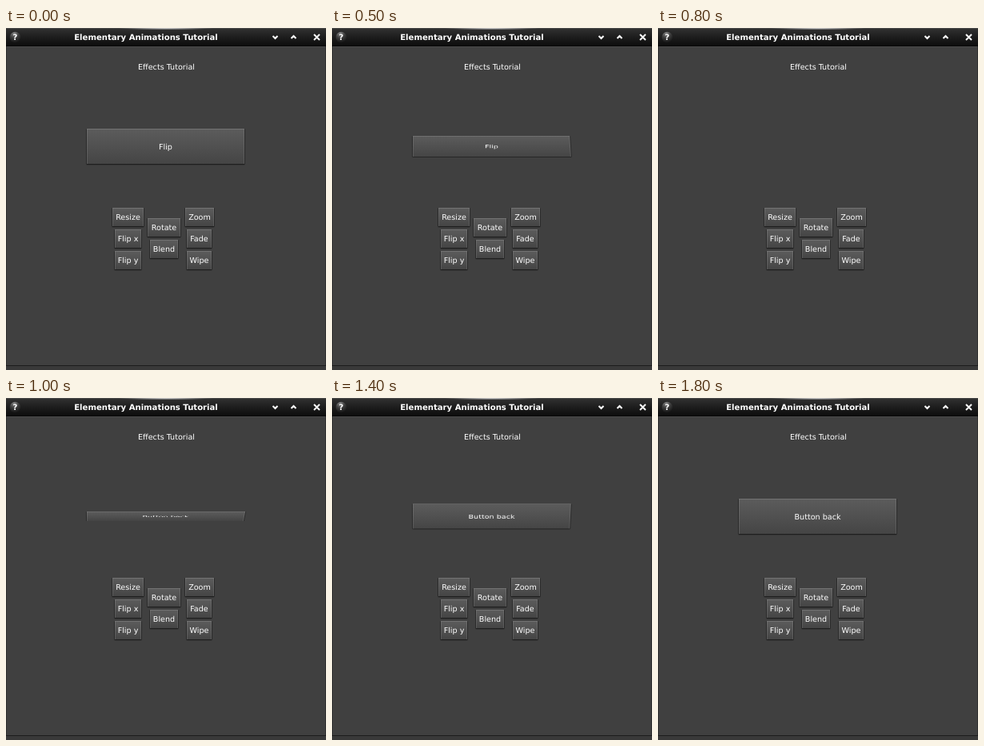
An HTML page that plays this animation: 400 px wide and 428 px high, repeating every 2100 ms.

```html
<!DOCTYPE html>
<html lang="en">
<head>
<meta charset="utf-8">
<title>Effects Tutorial</title>
<style>
  html, body { margin: 0; width: 400px; height: 428px; overflow: hidden; background: #404040; }
  svg { position: absolute; left: 0; top: 0; }
  text { font: 9.6px "DejaVu Sans", sans-serif; fill: #fff; text-anchor: middle; text-rendering: geometricPrecision; }
  .title { font-size: 10.1px; font-weight: bold; }
  .face { left: 97px; top: 122px; transform-origin: 10% 50%; }
</style>
</head>
<body>
<svg width="400" height="428">
  <defs>
    <linearGradient id="bar" x2="0" y2="1">
      <stop stop-color="#323232"/><stop offset=".5" stop-color="#1d1d1d"/><stop offset="1" stop-color="#0c0c0c"/>
    </linearGradient>
    <linearGradient id="raised" x2="0" y2="1">
      <stop stop-color="#5c5c5c"/><stop offset="1" stop-color="#454545"/>
    </linearGradient>
    <radialGradient id="glint">
      <stop stop-color="#fff" stop-opacity=".8"/><stop offset="1" stop-color="#fff" stop-opacity="0"/>
    </radialGradient>
    <radialGradient id="ball" cx=".4" cy=".15" r=".85">
      <stop stop-color="#888"/><stop offset=".5" stop-color="#3c3c3c"/><stop offset="1" stop-color="#161616"/>
    </radialGradient>
  </defs>
  <rect width="400" height="428" fill="#404040"/>
  <rect width="400" height="23" fill="url(#bar)"/>
  <rect width="400" height="1" fill="#484848"/>
  <ellipse cx="200" cy="0" rx="60" ry="2.5" fill="url(#glint)"/>
  <rect y="22" width="400" height="1" fill="#080808"/>
  <rect y="23" width="400" height="1" fill="#4a4a4a"/>
  <path d="M.5 23V428M399.5 23V428" stroke="#303030"/>
  <rect y="422" width="400" height="1" fill="#1c1c1c"/>
  <rect y="423" width="400" height="5" fill="#393939"/>
  <circle cx="11.5" cy="11.5" r="6.8" fill="url(#ball)"/>
  <text class="title" x="11.5" y="15">?</text>
  <text class="title" x="175" y="15">Elementary Animations Tutorial</text>
  <path d="M333.5 10l3 3 3-3M356.5 13l3-3 3 3M385 8l7 7M392 8l-7 7" fill="none" stroke="#fff" stroke-width="2"/>
  <text x="200.5" y="52">Effects Tutorial</text>
  <g id="buttons"></g>
</svg>
<svg class="face" id="front" width="206" height="52"></svg>
<svg class="face" id="back" width="206" height="52"></svg>
<script>
const $ = id => document.getElementById(id);

const button = (label, x, y, w, h = 23) => `
  <rect x="${x - 1}" y="${y}" width="${w + 2}" height="${h + 2}" rx="2" fill="#000" opacity=".18"/>
  <rect x="${x - .5}" y="${y}" width="${w + 1}" height="${h + 1}" rx="1" fill="#000" opacity=".4"/>
  <rect x="${x}" y="${y}" width="${w}" height="${h}" fill="url(#raised)"/>
  <rect x="${x}" y="${y}" width="${w}" height="1" fill="#727272"/>
  <path d="M${x + .5} ${y + 1}v${h - 1}M${x + w - .5} ${y + 1}v${h - 1}" stroke="#fff" opacity=".1"/>
  <text x="${x + w / 2}" y="${y + Math.floor(h / 2) + 4}">${label}</text>`;

$('buttons').innerHTML = [
  ['Resize', 133, 225, 39], ['Flip x', 136, 252, 33], ['Flip y', 136, 279, 33],
  ['Rotate', 177, 238, 41], ['Blend', 180, 265, 35],
  ['Zoom', 224, 225, 36], ['Fade', 226, 252, 31], ['Wipe', 226, 279, 31]
].map(b => button(...b)).join('');
$('front').innerHTML = button('Flip', 4, 4, 197, 44);
$('back').innerHTML = button('Button back', 4, 4, 197, 44);

// Flip angle in degrees: [time, angle], linear in between
const keys = [[300, 34], [500, 54], [800, 90], [1200, 120], [1400, 135], [1800, 180]];

function angleAt(t) {
  if (t < 300) return 0;
  if (t >= 1800) return 180;
  const i = keys.findIndex(k => k[0] > t);
  const [t0, a0] = keys[i - 1], [t1, a1] = keys[i];
  return a0 + (a1 - a0) * (t - t0) / (t1 - t0);
}

function pose(face, angle) {
  face.style.visibility = Math.abs(angle) < 90 ? 'visible' : 'hidden';
  face.style.transform = angle ? `perspective(3600px) rotateX(${angle}deg)` : 'none';
}

function draw() {
  const t = Math.floor(performance.now() % 2100 / 100) * 100;
  const angle = angleAt(t);
  pose($('front'), angle);
  pose($('back'), angle - 180);
  requestAnimationFrame(draw);
}
draw();
</script>
</body>
</html>
```
